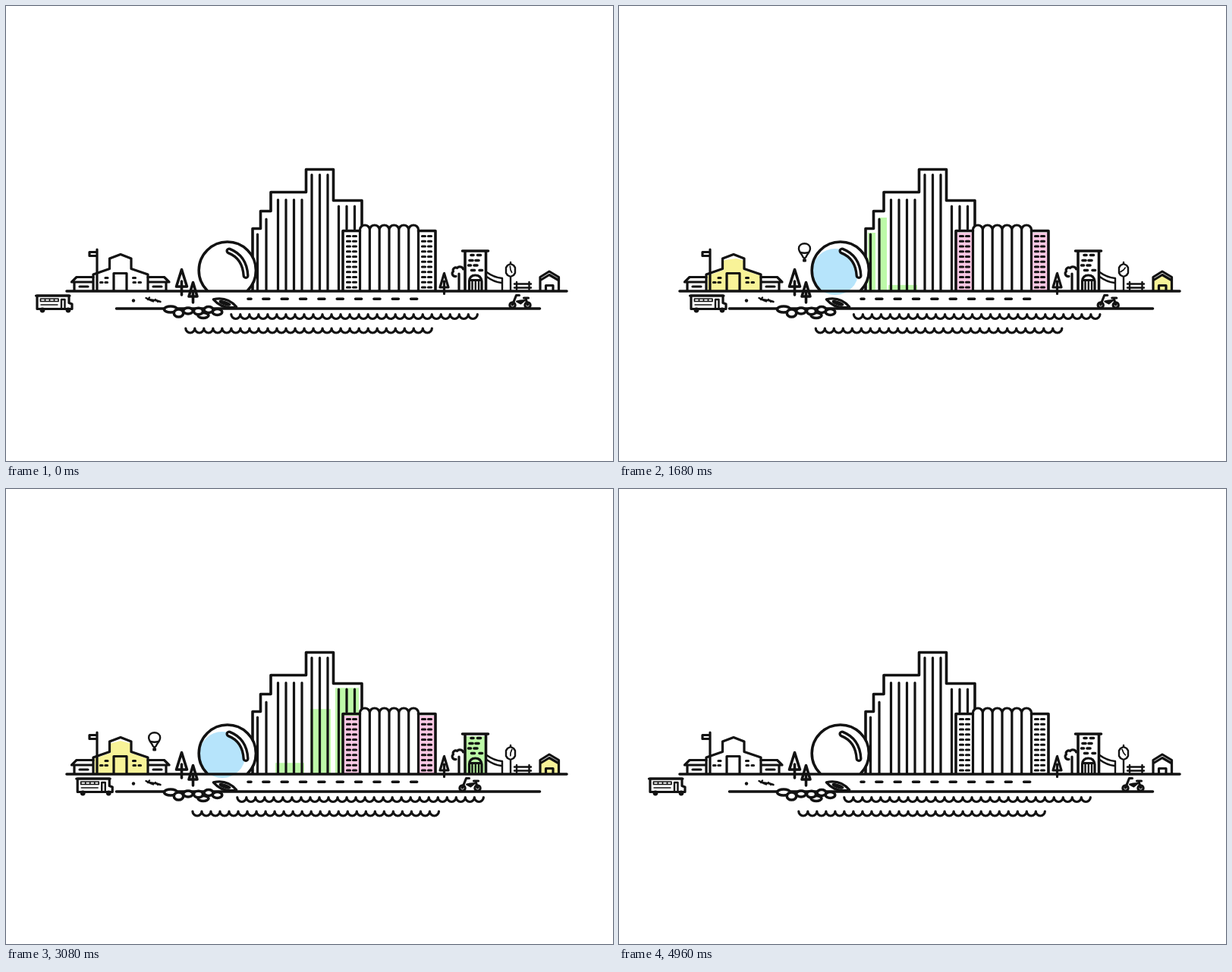
Animation, 800 px wide and 600 px high, one loop 5000 ms. Source, as an HTML page:

```html
<!DOCTYPE html>
<html lang="en">
<head>
<meta charset="utf-8">
<title>City by the water</title>
<style>
html, body { margin: 0; width: 100%; height: 100%; overflow: hidden; background: #fff; }
svg { display: block; width: 800px; height: 600px; }
.ink { fill: none; stroke: #121212; stroke-width: 3.6; stroke-linecap: round; stroke-linejoin: round; }
.mid { stroke-width: 3.2; }
.thin { stroke-width: 2.4; }
.fine { stroke-width: 1.7; }
.white { fill: #fff; }
.solid { fill: #121212; }
</style>
</head>
<body>
<svg viewBox="0 0 800 600" class="ink">
  <defs>
    <clipPath id="barnClip"><path d="M117 376V355.500L138 348V335.500L151 332L164 335.500V348L186 355.500V376Z"/></clipPath>
    <clipPath id="houseClip"><path d="M704 376V360L716 354L728 360V376Z"/></clipPath>
  </defs>

  <g id="balloon" class="thin">
    <path class="white" d="M-7.500 -4C-7.500 -13 7.500 -13 7.500 -4C7.500 0 3 4 2 7L0 9L-2 7C-3 4 -7.500 0 -7.500 -4Z"/>
    <path d="M-5.500 1Q0 2.500 5.500 1"/>
    <rect class="solid" x="-1.200" y="10.500" width="2.400" height="1.800"/>
  </g>

  <g id="bars" stroke="none" fill="#bdf9a8"></g>
  <path d="M325 375V293.500H335.500V270.500H349V245.500H395.500V215.500H431.500V256.500H469V289"/>
  <path id="ribs" class="mid"/>

  <g id="pinks" stroke="none" fill="#fac8e4"></g>
  <path d="M444 375V296.500H466.500M543.500 296.500H566V375"/>
  <path id="silo" class="mid"/>
  <path id="panes" class="mid"/>

  <circle class="white" cx="291.800" cy="348.800" r="37.600" stroke="none"/>
  <circle id="blue" cx="285" cy="350.500" fill="#b6e4fb" stroke="none"/>
  <path d="M265 375A37.600 37.600 0 1 1 318.600 375"/>
  <path d="M294 323Q314.500 331 316 355.500" stroke-width="9"/>
  <path d="M294 323Q314.500 331 316 355.500" stroke="#fff" stroke-width="2.400"/>

  <path class="white" d="M115 375V354L136.500 346.500V333L151 327.500L165 333V346.500L187 354V375Z" stroke="none"/>
  <path id="barn" fill="#f8f398" stroke="none" clip-path="url(#barnClip)"/>
  <path class="mid" d="M115 375V354L136.500 346.500V333L151 327.500L165 333V346.500L187 354V375M142 375V352.500H159V375"/>
  <path class="mid" d="M131 358.500h3M124.500 364.500h2.500M131 364.500h2.500M167.500 358.500h3M168 364.500h2.500M175 364.500h2.500"/>
  <path class="mid" d="M115 357.500H93L86.500 364H114M90 365V375M97 370H108M187 357.500H208.500L215 364H188M211 365V375M194 370H205"/>
  <path class="mid" d="M120 321V375M118 324.500H110V329.500H118"/>

  <rect id="tower" y="326" height="50" fill="#bdf9a8" stroke="none"/>
  <path d="M601.500 323H635.500M605 324V375M632.500 324V375"/>
  <path d="M613 328.500h3M621.500 328.500h4M611 335.500h4M619 335.500h4M609.500 342h3M617 342h4M613.500 348.500h4M624 348.500h3.500"/>
  <path class="mid" d="M610.500 375V363Q611 355 618.500 355T627 363V375M611 361.500H626"/>
  <path class="thin" d="M614.500 362V374M618.800 362V374M623 362V374"/>
  <path class="thin" d="M633.500 351Q643 358 654 359V375M633.500 357Q643 364 653 365"/>
  <path class="mid" d="M597 375V353M593 356.500C588 357 587 352 589.500 350C588 346 592 344 594.500 345.500C597 342.500 602 344 602.500 347"/>

  <g class="thin">
    <path d="M665 358V375M665 338V340M661 342L665 340L669 342L671 345V352L669 355L665 357L661 355L659 352V345Z"/>
    <path id="hands" class="fine" d="M0 -5V0L1.200 3.500"/>
  </g>
  <path class="thin" d="M670 366.500H692M670 371.500H692M673 364V374M689.500 364V374"/>
  <rect id="house" x="703" width="26" fill="#f8f398" stroke="none" clip-path="url(#houseClip)"/>
  <path class="mid" d="M704 375V357.500L716 350L728.500 357.500V375M704.500 361.500L716 354.500L728 361.500M711.500 375V368.500H721V375"/>

  <path d="M80 376H739M145.500 399H703.500"/>
  <path id="road"/>
  <path d="M231.500 347.500L224.500 370H238.500ZM231.500 363V381M246.500 364.500L241 383H252ZM246.500 376V391"/>
  <path class="mid" d="M577.500 352.500L572 371H583ZM577.500 363V379.500"/>
  <circle class="solid" cx="168" cy="388.500" r="2.200" stroke="none"/>
  <path class="thin" d="M184.500 385L188 387L199 388.500L203.500 390M189 384.500L187 387M190 388l4 1.500M197 387l3 3"/>

  <g id="rocks" class="white"></g>
  <g transform="translate(288.500 391.800) rotate(18)">
    <path class="white mid" d="M-16 0Q0 -9.500 16 0Q0 9.500 -16 0Z"/>
    <ellipse class="solid" rx="6.500" ry="1"/>
  </g>

  <path id="waveTop" class="mid"/>
  <path id="waveLow" class="mid"/>

  <g id="bus" class="mid">
    <path class="white" d="M41 382H83V391.500L87 393V399.500H41Z"/>
    <path d="M39.500 382H84"/>
    <path class="fine" d="M45.500 386H69V389.500H45.500ZM51.500 386V389.500M57.500 386V389.500M63.500 386V389.500"/>
    <path d="M46 394H68" stroke-width="1.300"/>
    <path class="thin" d="M73 398V387H77.500V398"/>
    <circle class="solid" cx="48" cy="401" r="1.800"/><circle class="solid" cx="82" cy="401" r="1.800"/>
  </g>

  <g id="bike" class="mid">
    <circle cx="667.500" cy="394.500" r="3.600"/><circle cx="687.500" cy="394.500" r="3.600"/>
    <path d="M667.500 394L672.500 381.500H676.500M682.500 385H688.500M685 386L687.500 394"/>
    <path class="solid" d="M673 389.500L677.500 388.500L684 388L678.500 392.500Z" stroke-width="2"/>
  </g>
</svg>
<script>
const LOOP = 5000, GROUND = 375;
const $ = id => document.getElementById(id);
const set = (el, attrs) => { for (const k in attrs) el.setAttribute(k, attrs[k]); };
const add = (parent, tag, attrs) => {
  const el = document.createElementNS('http://www.w3.org/2000/svg', tag);
  set(el, attrs);
  return parent.appendChild(el);
};
const range = n => [...Array(n).keys()];

// Eased progress from a to b, and an in-hold-out pulse
const ease = (t, a, b) => {
  const u = Math.min(1, Math.max(0, (t - a) / (b - a)));
  return (1 - Math.cos(Math.PI * u)) / 2;
};
const pulse = (t, a, b, c, d) => ease(t, a, b) - ease(t, c, d);

function track(keys, t, col) {
  let i = 0;
  while (i < keys.length - 2 && t > keys[i + 1][0]) i++;
  const p = keys[i], q = keys[i + 1];
  const u = Math.min(1, Math.max(0, (t - p[0]) / (q[0] - p[0])));
  return p[col] + (q[col] - p[col]) * u;
}

const ribs = [[301, 331.5], [281, 343], [255.5, 358.5, 369, 379.5, 390],
  [222.5, 403, 413.5, 424], [264, 438.5]];
set($('ribs'), { d: ribs.map(([y, ...xs]) => xs.map(x => `M${x} ${y}V375`).join('')).join('') +
  'M438.500 264V294M449 264V294M459.500 264V294' });

const COL = 77 / 6;
set($('silo'), { d: 'M466.500 375V295' + range(6).map(i => {
  const x = 466.5 + COL * (i + 1);
  return `a${COL / 2} 6 0 0 1 ${COL} 0M${x} 375V295`;
}).join('') });
set($('panes'), { d: range(11).map(i =>
  [449.5, 457.5, 548.5, 556.5].map(x => `M${x} ${303.5 + 6.75 * i}h4`).join('')).join('') });
set($('road'), { d: range(10).map(i => `M${i ? 314.5 + 24.35 * i : 319} 386.300h${i ? 8 : 4}`).join('') });

const stones = [[217, 400, 8.5, 4], [227.5, 405, 6.2, 5], [240, 402, 6.3, 4], [260, 408, 7, 3.5],
  [253.5, 402.5, 6, 4.2], [267, 400.5, 6, 4], [278.5, 403.5, 6.3, 4]];
stones.forEach(([cx, cy, rx, ry]) => add($('rocks'), 'ellipse', { cx, cy, rx, ry }));

const scallops = range(27).map(() => 'a6.010 6 0 0 0 12.020 0').join('');
set($('waveTop'), { d: 'M296.800 406.500' + scallops });
set($('waveLow'), { d: 'M236.800 425' + scallops });

// x, width, top, then rise and fall start times
const bars = [[328, 10, 299, 560, 2140], [342, 11, 279, 1040, 2330], [355, 38, 251, 1576, 2584],
  [401, 27, 219, 1872, 2780], [434, 31, 262, 2070, 3060]].map(([x, width, top, up, down]) =>
  ({ el: add($('bars'), 'rect', { x, width }), top, up, down }));
const pinks = [445, 544].map(x => add($('pinks'), 'rect', { x, width: 21.5 }));

const flight = [[400, 290, 336], [1040, 268, 323], [1680, 244.5, 324], [2320, 219.5, 327],
  [3080, 195.7, 332], [3760, 176.7, 338], [4500, 156, 350]];

const level = (el, top, amount) => {
  const height = (GROUND + 1 - top) * amount;
  set(el, { y: GROUND + 1 - height, height });
};
const move = (id, x, y = 0) => set($(id), { transform: `translate(${x} ${y})` });

function draw(t) {
  bars.forEach(b => level(b.el, b.top, pulse(t, b.up, b.up + 640, b.down, b.down + 640)));
  const pink = pulse(t, 940, 1600, 3270, 3850);
  pinks.forEach(el => level(el, 299, pink));

  set($('blue'), { r: 30.5 * pulse(t, 620, 1480, 3600, 4360) });
  level($('house'), 354, pulse(t, 1160, 1760, 3440, 4200));

  const green = 26 * pulse(t, 1700, 2280, 3480, 4160);
  set($('tower'), { x: 631.5 - green, width: green });

  const full = pulse(t, 1080, 1760, 3220, 4130);
  const y = GROUND + 3 - 46 * full, s = 3 * Math.sin(t / 350);
  set($('barn'), { d: full > 0.001 ? `M115 377V${y}Q133 ${y - s} 151 ${y}T187 ${y}V377Z` : '' });

  move('balloon', track(flight, t, 1), track(flight, t, 2));
  move('bus', 54 * pulse(t, 320, 1690, 2950, 4690));
  move('bike', -66 * pulse(t, 820, 2550, 3060, 4960));
  move('waveTop', 18 * (pulse(t, 0, 1200, 1200, 2500) + pulse(t, 2500, 3750, 3750, 4960)));
  move('waveLow', 30 * ease(t, 0, 1200) - 25 * ease(t, 1200, 2500) +
    25 * ease(t, 2820, 3800) - 30 * ease(t, 3800, 4960));
  set($('hands'), { transform: `translate(665 348) rotate(${t / LOOP * 1800 - 8})` });
}

const start = performance.now();
function tick() {
  draw((performance.now() - start) % LOOP);
  requestAnimationFrame(tick);
}
tick();
</script>
</body>
</html>
```
